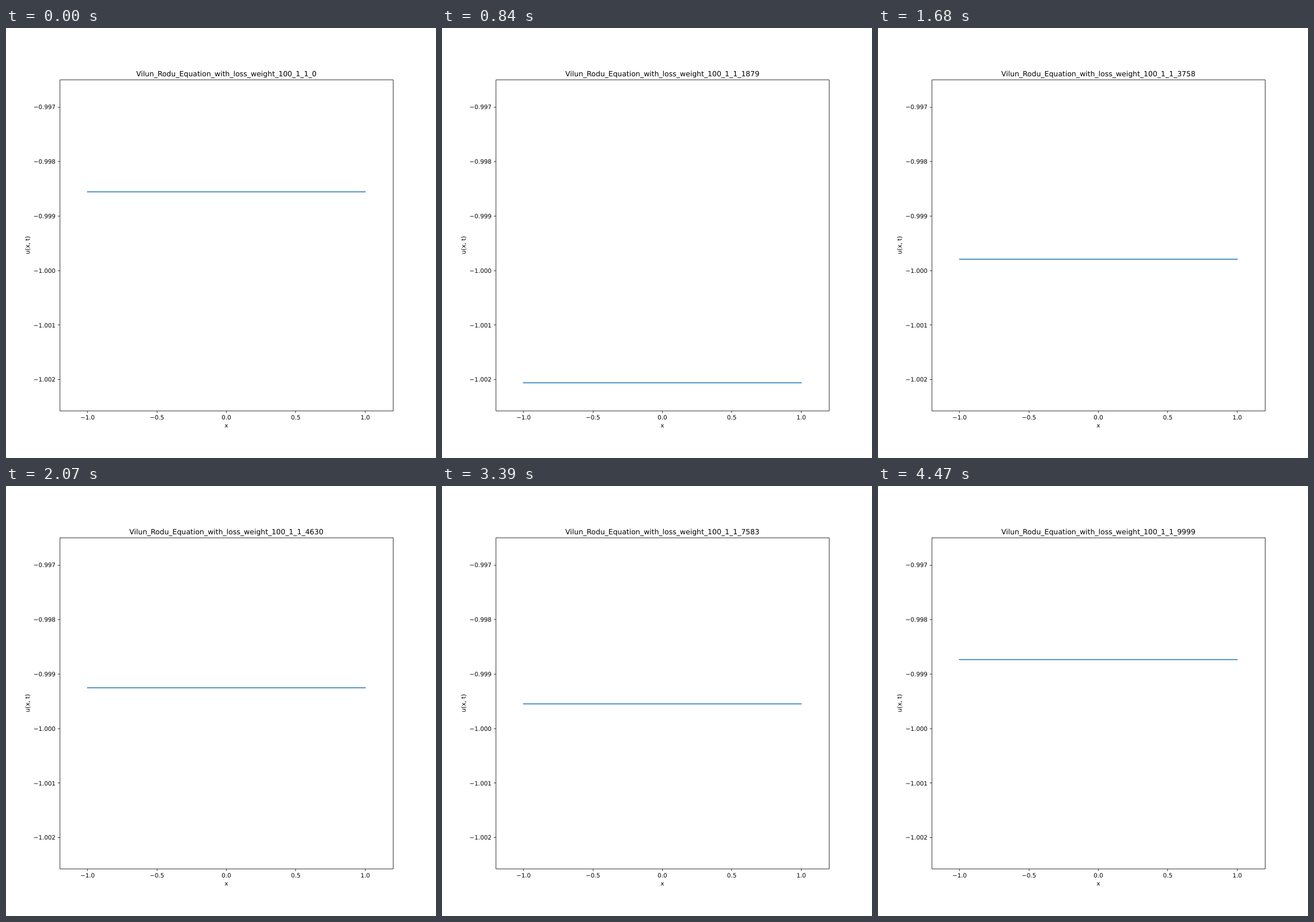
An HTML page that plays this animation: 748 by 748 pixels, repeating every 4.5 s.

```html
<!DOCTYPE html>
<html lang="en">
<head>
<meta charset="utf-8">
<title>Equation plot</title>
<style>
  html, body { margin: 0; width: 100%; height: 100%; overflow: hidden; background: #fff; }
  svg { display: block; width: 748px; height: 748px; }
  text { font: 13.889px "DejaVu Sans", sans-serif; text-anchor: middle; text-rendering: geometricPrecision; }
  .end { text-anchor: end; }
  #title { font-size: 16.667px; }
  #axes { fill: none; stroke: #000; stroke-width: 1.1; }
  #curve { stroke: #1f77b4; stroke-width: 2.08; stroke-linecap: square; }
</style>
</head>
<body>
<svg viewBox="0 0 1000 1000">
  <text id="title" x="512.5" y="111.67"></text>
  <path id="axes"/>
  <g id="labels"></g>
  <text x="512.5" y="929.8">x</text>
  <text transform="translate(54.8 505) rotate(-90)">u(x, t)</text>
  <line id="curve" x1="189.58" x2="835.42"/>
</svg>
<script>
const LOOP = 4500, STEP = 30, LAST = LOOP / STEP - 1, SCALE = 0.748;

// [time in ms, height in stage px, slope in px per ms]
const KEYS = [
  [0, 285, 0.55], [540, 547, 0.417], [885, 618.5, 0], [1080, 595, -0.24],
  [1290, 534, -0.335], [1620, 420, -0.32], [2070, 351, 0.01], [2700, 460, 0.175],
  [2730, 465, 0.165], [2940, 483, 0], [3240, 436, -0.33], [3390, 379, -0.42],
  [3780, 200, -0.44], [4070, 137.4, 0], [4470, 302, 0.72]
];

const $ = id => document.getElementById(id);

function addLabel(x, y, str, cls) {
  const el = document.createElementNS("http://www.w3.org/2000/svg", "text");
  el.setAttribute("x", x);
  el.setAttribute("y", y);
  if (cls) el.setAttribute("class", cls);
  el.textContent = str.replace("-", "\u2212");
  $("labels").append(el);
}

function drawAxes() {
  const snap = v => Math.floor(v) + 0.5;
  let d = "M125.5 120.5H900.5V890.5H125.5Z";
  for (let k = 0; k < 5; k++) {
    const x = 189.58 + 161.46 * k;
    d += `M${snap(x)} 890.5v4.9`;
    addLabel(x, 910.8, (k / 2 - 1).toFixed(1));
  }
  for (let k = 0; k < 6; k++) {
    const y = 184 + 126.72 * k;
    d += `M125.5 ${snap(y)}h-4.9`;
    addLabel(115.28, y + 5, (-0.997 - k / 1000).toFixed(3), "end");
  }
  $("axes").setAttribute("d", d);
}

// Cubic Hermite interpolation between neighbouring keys
function heightAt(t) {
  const i = Math.max(1, KEYS.findIndex(k => k[0] >= t));
  const [t0, y0, m0] = KEYS[i - 1], [t1, y1, m1] = KEYS[i];
  const h = t1 - t0, s = (t - t0) / h, r = 1 - s;
  return r * r * ((1 + 2 * s) * y0 + s * h * m0) + s * s * ((3 - 2 * s) * y1 - r * h * m1);
}

let shown = -1;
function render(now) {
  const n = Math.floor((now % LOOP) / STEP);
  if (n !== shown) {
    shown = n;
    const epoch = Math.floor(n * 9999 / LAST);
    const y = heightAt(n * STEP) / SCALE;
    $("title").textContent = `Vilun_Rodu_Equation_with_loss_weight_100_1_1_${epoch}`;
    $("curve").setAttribute("y1", y);
    $("curve").setAttribute("y2", y);
  }
}

drawAxes();
const start = performance.now();
function tick() {
  render(performance.now() - start);
  requestAnimationFrame(tick);
}
tick();
</script>
</body>
</html>
```
